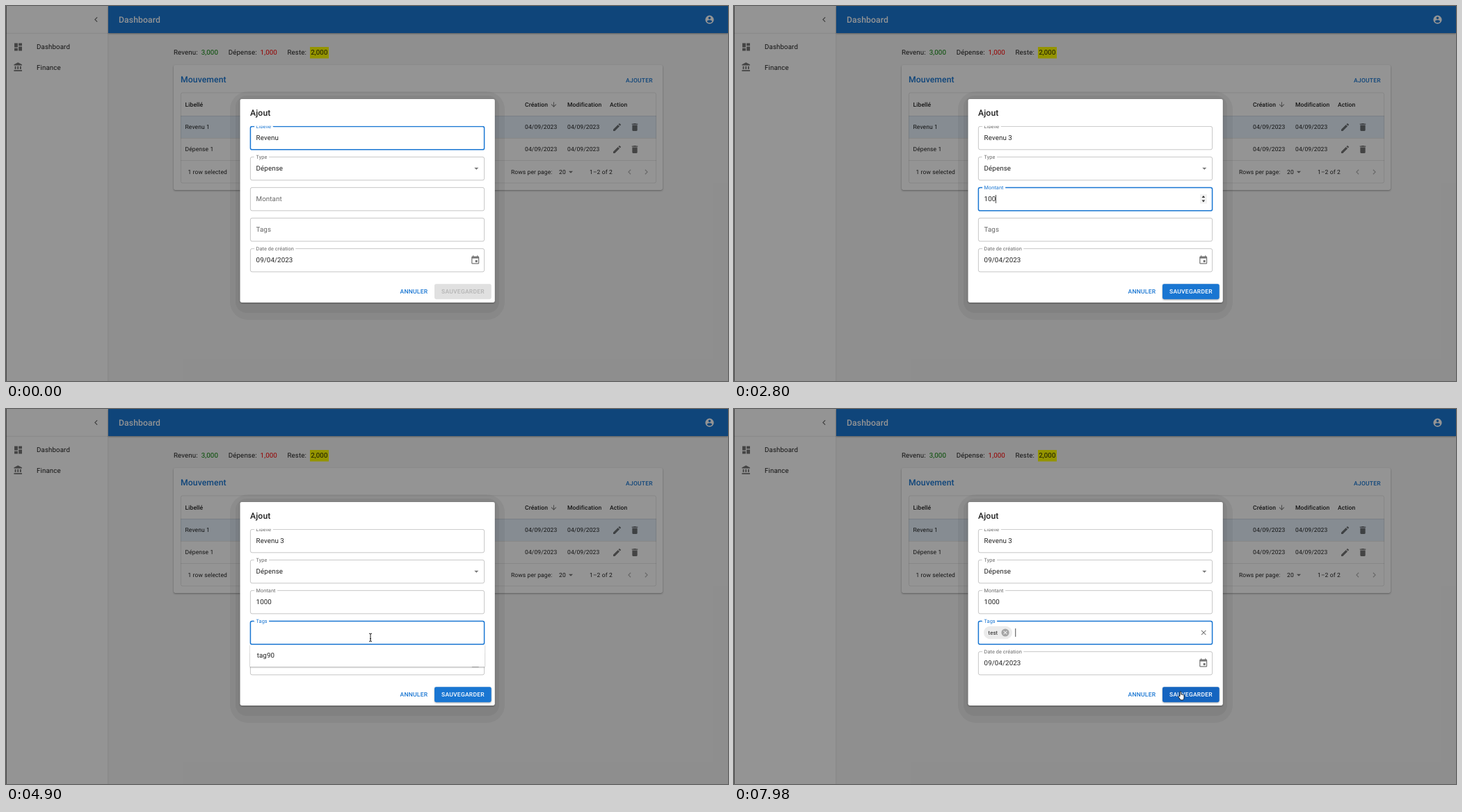
Write an HTML page that moves like this. It is 1038 by 540 pixels and loops after 8 s.

```html
<!DOCTYPE html>
<html lang="fr">
<head>
<meta charset="utf-8">
<title>Dashboard</title>
<style>
html, body { margin: 0; width: 100%; height: 100%; overflow: hidden; background: #8e8e8e; }
svg { display: block; width: 100vw; height: 100vh; font-family: Roboto, sans-serif; text-rendering: geometricPrecision; }
.shadow { filter: drop-shadow(0 1px 1px rgba(0,0,0,.35)); }
</style>
</head>
<body>
<svg viewBox="0 0 1038 540">
  <defs><clipPath id="content"><rect x="337" y="172.7" width="366" height="220"/></clipPath></defs>
  <g id="page"></g>
  <g id="dialog"></g>
</svg>
<script>
const LOOP = 8000, STEP = 70, BLINK = 530;
const INK = 'rgba(0,0,0,.87)', SOFT = 'rgba(0,0,0,.6)', ICON = 'rgba(0,0,0,.54)', BLUE = '#1976d2';
const BODY = 9.76, SMALL = 8.54, TITLE = 12.2;
const LEFT = 351, RIGHT = 688, TEXT_X = 359.6, FIELD_H = 34;

const ICONS = {
  dashboard: 'M3 13h8V3H3zm0 8h8v-6H3zm10 0h8V11h-8zm0-18v6h8V3z',
  bank: 'M4 10v7h3v-7zm6 0v7h3v-7zM2 22h19v-3H2zm14-12v7h3v-7zm-4.5-9L2 6v2h19V6z',
  left: 'M15.4 7.4 14 6l-6 6 6 6 1.4-1.4L10.8 12z',
  right: 'M10 6 8.6 7.4 13.2 12l-4.6 4.6L10 18l6-6z',
  account: 'M12 2a10 10 0 1 0 0 20 10 10 0 0 0 0-20zm0 3a3 3 0 1 1 0 6 3 3 0 0 1 0-6zm0 14.2c-2.5 0-4.7-1.3-6-3.2 0-2 4-3.1 6-3.1s6 1.1 6 3.1c-1.3 1.9-3.5 3.2-6 3.2z',
  edit: 'M3 17.2V21h3.8L17.8 9.9l-3.7-3.7zM20.7 7c.4-.4.4-1 0-1.4l-2.3-2.3a1 1 0 0 0-1.4 0l-1.9 1.8 3.8 3.8z',
  trash: 'M6 19c0 1.1.9 2 2 2h8c1.1 0 2-.9 2-2V7H6zM19 4h-3.5l-1-1h-5l-1 1H5v2h14z',
  down: 'M20 12l-1.4-1.4-5.6 5.6V4h-2v12.2l-5.6-5.6L4 12l8 8z',
  drop: 'M7 10l5 5 5-5z',
  event: 'M17 12h-5v5h5zM16 1v2H8V1H6v2H5a2 2 0 0 0-2 2v14c0 1.1.9 2 2 2h14a2 2 0 0 0 2-2V5a2 2 0 0 0-2-2h-1V1zm3 18H5V8h14z',
  close: 'M19 6.4 17.6 5 12 10.6 6.4 5 5 6.4 10.6 12 5 17.6 6.4 19 12 13.4 17.6 19 19 17.6 13.4 12z',
  cancel: 'M12 2a10 10 0 1 0 0 20 10 10 0 0 0 0-20zm5 13.6L15.6 17 12 13.4 8.4 17 7 15.6 10.6 12 7 8.4 8.4 7 12 10.6 15.6 7 17 8.4 13.4 12z'
};

const POINTERS = {
  arrow: '<path d="M0 0V7.6L1.8 6 3 8.9 4.2 8.4 3 5.6H5.4Z" stroke="#fff" stroke-width=".9" paint-order="stroke"/>',
  hand: '<path d="M-1 7V.8a.9.9 0 0 1 1.8 0V4.2a.9.9 0 0 1 1.5.3.9.9 0 0 1 1.4.4.8.8 0 0 1 1.3.7V8.5Q4.9 11 3.7 12H0Q-1 10.4-3 7.6-3.3 6.2-2 6.4Z" fill="#fff" stroke="#000" stroke-width=".8"/>',
  beam: [['#fff', 2], ['#000', .9]].map(([color, width]) =>
    `<path d="M-2-5.8Q0-5.8 0-4.5 0-5.8 2-5.8M0-4.5V4.5M-2 5.8Q0 5.8 0 4.5 0 5.8 2 5.8M-1 1.8H1" fill="none" stroke="${color}" stroke-width="${width}"/>`).join('')
};

// Drawing helpers; text is placed by its left edge and the middle of its capitals.
const text = (x, middle, string, { size = BODY, fill = INK, weight = 400, spacing = .0094, extra = '' } = {}) =>
  `<text x="${x}" y="${middle + .355 * size}" font-size="${size}" fill="${fill}" font-weight="${weight}" letter-spacing="${spacing * size}" ${extra}>${string}</text>`;
const small = (x, y, string, options) => text(x, y, string, { size: SMALL, spacing: .0107, ...options });
const button = (x, y, string, fill) => small(x, y, string, { fill, weight: 500, spacing: .0286 });
const heading = (x, y, string, fill) => text(x, y, string, { size: TITLE, weight: 500, spacing: .0075, fill });
const rect = (x, y, w, h, fill, extra = '') => `<rect x="${x}" y="${y}" width="${w}" height="${h}" fill="${fill}" ${extra}/>`;
const icon = (name, x, y, fill = ICON, size = 14.64) =>
  `<path d="${ICONS[name]}" fill="${fill}" transform="translate(${x - size / 2} ${y - size / 2}) scale(${size / 24})"/>`;

// Timing helpers
const at = (t, steps) => steps.findLast(([time]) => t >= time)[1];
const progress = (t, start, length) => Math.min(1, Math.max(0, (t - start) / length));
const easeOut = p => 1 - (1 - p) ** 3;
const mix = (a, b, p) => `rgb(${a.map((v, i) => Math.round(v + (b[i] - v) * p))})`;

const ruler = document.createElement('canvas').getContext('2d');
function textWidth(string) {
  ruler.font = `${BODY * 10}px Roboto, sans-serif`;
  return ruler.measureText(string).width / 10 + string.length * BODY * .0094;
}

function drawPage() {
  const line = 'rgba(0,0,0,.13)';
  const row = (y, name) => small(257.5, y, name) + small(746, y, '04/09/2023') + small(807, y, '04/09/2023') +
    icon('edit', 878.5, y + .5) + icon('trash', 904, y + .5);
  return rect(0, 0, 1038, 540, '#f5f5f5') +
    rect(0, 0, 147, 540, '#fff') + rect(146.4, 0, .7, 540, line) + rect(0, 38.8, 147, .7, line) +
    icon('left', 129.5, 19.5) +
    icon('dashboard', 17.5, 59) + text(44, 59, 'Dashboard') +
    icon('bank', 17.5, 88) + text(44, 88.3, 'Finance') +
    rect(147, 0, 891, 39, BLUE, 'class="shadow"') + heading(162, 19.8, 'Dashboard', '#fff') + icon('account', 1011.5, 19.7, '#fff') +
    text(241, 67, 'Revenu:') + text(280.7, 67, '3,000', { fill: 'green' }) +
    text(319.8, 67, 'Dépense:') + text(365.6, 67, '1,000', { fill: 'red' }) +
    text(404.5, 67, 'Reste:') + rect(437, 59, 27, 16.5, '#ff0') + text(438.2, 67, '2,000') +
    rect(241, 85, 703, 180, '#fff', 'rx="2.4" class="shadow"') +
    heading(251, 105.3, 'Mouvement', BLUE) + button(891, 107, 'AJOUTER', BLUE) +
    rect(251, 158, 684, 32, 'rgba(25,118,210,.1)') +
    [158, 190, 222].map(y => rect(251, y, 684, .7, line)).join('') +
    rect(251.4, 124.9, 683.2, 130, 'none', `rx="2.4" stroke="${line}" stroke-width=".8"`) +
    [[257.5, 'Libellé'], [746, 'Création'], [807, 'Modification'], [868, 'Action']]
      .map(([x, name]) => small(x, 142, name, { weight: 500 })).join('') +
    icon('down', 787.5, 142, ICON, 11) +
    row(174, 'Revenu 1') + row(206, 'Dépense 1') +
    small(261.5, 239, '1 row selected') + small(726, 239, 'Rows per page:') + small(795, 238.7, '20') +
    icon('drop', 812, 239) + small(839, 239, '1–2 of 2') +
    icon('left', 896.5, 239, 'rgba(0,0,0,.3)') + icon('right', 920.5, 239, 'rgba(0,0,0,.3)') +
    rect(0, 0, 1038, 540, 'rgba(0,0,0,.42)') +
    rect(322, 123, 395, 329, 'rgba(0,0,0,.05)', 'rx="26"') +
    rect(330, 129, 379, 313, 'rgba(0,0,0,.05)', 'rx="16"') +
    rect(0, 0, 1, 540, 'rgba(0,0,0,.5)') +
    rect(336.5, 134, 366.3, 293, '#fff', 'rx="2.4" class="shadow"') +
    heading(351, 153.7, 'Ajout', INK);
}

function field(top, label, { value = '', raised = 1, focused, hovered, extra = '' }) {
  const stroke = focused ? BLUE : hovered ? '#212121' : 'rgba(0,0,0,.25)';
  const size = BODY * (1 - raised / 4);
  const notch = raised > 0 ? 'stroke="#fff" stroke-width="6" paint-order="stroke"' : '';
  return rect(LEFT + .4, top + .4, RIGHT - LEFT - .8, FIELD_H - .6, 'none',
      `rx="2.4" stroke="${stroke}" stroke-width="${focused ? 1.5 : .9}"`) +
    text(TEXT_X, top + 17 * (1 - raised), label, { size, fill: focused ? BLUE : SOFT, extra: notch }) +
    text(TEXT_X, top + 17, value) + extra;
}

// Pointer tracks: [time, x, y]; each is visible from its first time until `until`.
const TRACKS = [
  { until: 2380, points: [[1120, 452, 192], [1330, 449, 222], [1540, 445, 267], [1680, 444, 277]] },
  { until: 6160, points: [[3430, 444, 278], [3570, 505, 330], [3710, 586, 396.5], [3800, 588, 399], [4000, 560, 372], [4200, 524, 329]] },
  { until: LOOP, points: [[7490, 524, 329], [7700, 600, 385], [7840, 642, 407]] }
];

function pointerAt(t) {
  const track = TRACKS.find(({ until, points }) => t >= points[0][0] && t < until);
  if (!track) return null;
  const { points } = track;
  const next = points.findIndex(([time]) => time > t);
  if (next < 0) return points.at(-1).slice(1);
  const [t0, x0, y0] = points[next - 1], [t1, x1, y1] = points[next];
  const p = (t - t0) / (t1 - t0);
  return [x0 + (x1 - x0) * p, y0 + (y1 - y0) * p];
}

const NAME = [[0, 'Revenu'], [490, 'Revenu '], [770, 'Revenu 3']];
const AMOUNT = [[0, ''], [2380, '1'], [2590, '10'], [2800, '100'], [2940, '1000']];
const TAG = [[0, ''], [6160, 't'], [6370, 'te'], [6440, 'tes'], [6540, 'test'], [7350, '']];
const CARET_RESET = [0, 420, 490, 770, 1820, 2380, 2590, 2800, 2940, 4335, 6160, 6370, 6440, 6540, 7470];
const TOPS = [173, 217, 261, 305, 349];

function drawDialog(t) {
  const name = at(t, NAME), amount = at(t, AMOUNT), tag = at(t, TAG);
  const chip = t >= 7350, popup = t >= 4410 && t < 6370;
  const focus = t < 1820 ? 0 : t < 4335 ? 2 : 3;
  const pointer = pointerAt(t);
  const hover = pointer ? TOPS.findIndex(top => pointer[1] >= top && pointer[1] < top + FIELD_H) : -1;
  const onSave = pointer && pointer[0] > 616 && pointer[1] > 400;
  const state = i => ({ focused: focus === i, hovered: hover === i });

  const spinner = focus === 2 || hover === 2
    ? rect(670, 271, 10, 13.5, '#f2f2f2') + '<path d="M672.6 276l2.3-3 2.3 3zm0 3.6h4.6l-2.3 3z" fill="#333"/>' : '';
  const chipArt = chip
    ? rect(359, 312.7, 41, 18.6, '#ebebeb', 'rx="9.3"') + text(365.5, 322, 'test', { size: 7.93 }) + icon('cancel', 390, 322, 'rgba(0,0,0,.3)', 13.4) : '';
  const clear = tag || chip ? icon('close', 675.2, 322, ICON, 12.2) : '';

  const fields = [
    field(TOPS[0], 'Libellé', { value: name, ...state(0) }),
    field(TOPS[1], 'Type', { value: 'Dépense', ...state(1), extra: icon('drop', 676.3, 234) }),
    field(TOPS[2], 'Montant', { value: amount, raised: easeOut(progress(t, 1820, 200)), ...state(2), extra: spinner }),
    field(TOPS[4], 'Date de création', { value: '09/04/2023', ...state(4), extra: icon('event', 674.7, 366) }),
    popup ? rect(LEFT, 339, RIGHT - LEFT, 32, '#fff', 'class="shadow"') + text(360.7, 355, 'tag90') : '',
    field(TOPS[3], 'Tags', { value: tag, raised: easeOut(progress(t, 4335, 200)), ...state(3), extra: chipArt + clear })
  ].join('');

  const since = t < 420 ? -BLINK : CARET_RESET.findLast(time => t >= time);
  const lit = since < 0 ? false : chip ? t >= 7470 : Math.floor((t - since) / BLINK) % 2 === 0;
  const typed = focus === 0 ? name : focus === 2 ? amount : tag;
  const caretX = chip ? 404.6 : TEXT_X + textWidth(typed);
  const caret = lit ? rect(caretX - .2, TOPS[focus] + 11, .8, 12, INK) : '';

  const enabled = progress(t, 2380, 250), darker = onSave ? 1 : 0;
  const fill = mix([224, 224, 224], darker ? [21, 101, 192] : [25, 118, 210], enabled);
  const label = mix([180, 180, 180], [255, 255, 255], enabled);
  const kind = onSave || hover === 1 ? 'hand' : hover >= 0 ? 'beam' : 'arrow';

  return `<g clip-path="url(#content)">${fields}${caret}</g>` +
    button(566.5, 411.2, 'ANNULER', BLUE) +
    rect(616, 400.2, 81.7, 22, fill, `rx="2.4" ${enabled ? 'class="shadow"' : ''}`) +
    button(626, 411.2, 'SAUVEGARDER', label) +
    (pointer ? `<g transform="translate(${pointer})">${POINTERS[kind]}</g>` : '');
}

const dialog = document.getElementById('dialog');
document.getElementById('page').innerHTML = drawPage();
const start = performance.now();
function frame() {
  const t = (performance.now() - start) % LOOP;
  dialog.innerHTML = drawDialog(Math.floor(t / STEP) * STEP);
  requestAnimationFrame(frame);
}
frame();
</script>
</body>
</html>
```
